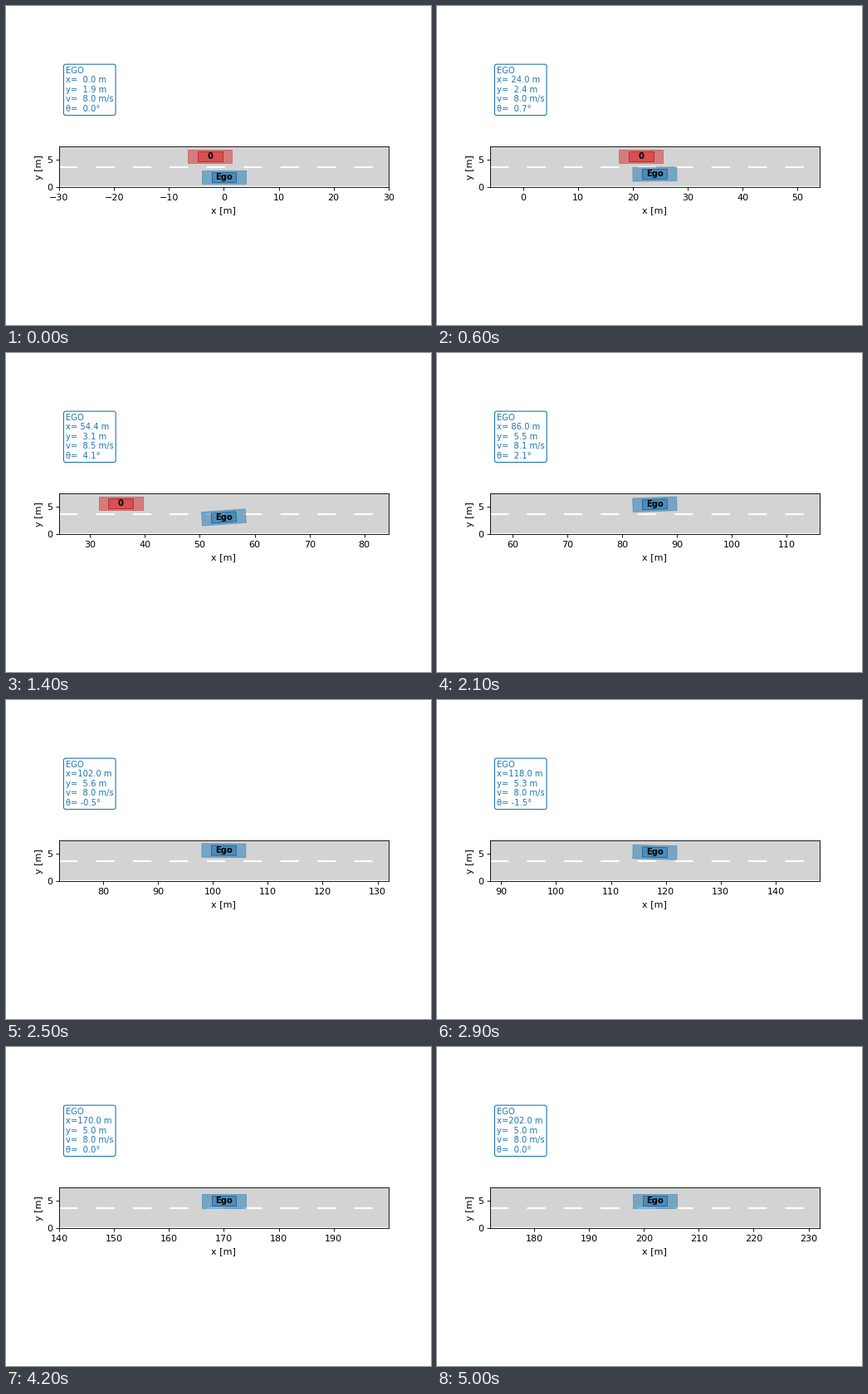
These frames come from a looping animation (512x384 px, 5.1 s). A matplotlib script:

```python
import matplotlib.pyplot as plt
import numpy as np
from matplotlib.animation import FuncAnimation
from matplotlib.colors import to_rgba
from matplotlib.patches import Rectangle

FRAMES, INTERVAL = 51, 100
DT = 0.5              # simulated seconds per frame
CRUISE = 8.0          # m/s
LANE = 3.7
VIEW = 30             # metres shown on each side of the ego car

plt.rcParams["font.family"] = "DejaVu Sans"


def bell(t, height, center, width):
    return height * np.exp(-((t - center) / width) ** 2 / 2)


def hump(t, height, start, length):
    """Smooth rise and fall that is zero outside its span."""
    phase = np.clip((t - start) / length, 0, 1)
    return height * np.sin(np.pi * phase) ** 2


def travel(start, rate):
    """Integrate a per-step rate with the trapezoid rule."""
    steps = (rate[1:] + rate[:-1]) / 2
    return start + np.concatenate([[0], np.cumsum(steps)])


# Ego: brakes behind the gap, speeds up to change lane, then settles.
n = np.arange(FRAMES)
speed = CRUISE - bell(n, 0.98, 10.4, 1.565) + bell(n, 1.735, 16.7, 1.8)
heading = (hump(n, 2.15, 0, 7.5) + hump(n, 5.1, 8.15, 16.5)
           - hump(n, 1.52, 22.6, 12.4))
ego_x = travel(0, speed * DT)
ego_y = travel(1.88, speed * DT * np.tan(np.radians(heading)))

# Other car: brakes to a halt, then creeps on; integrated on a fine grid.
SUB = 20
fine = np.arange((FRAMES - 1) * SUB + 1) / SUB
other_speed = np.interp(fine, [6, 13.05, 16.2, 19], [CRUISE, 0, 0, 3])
other_x = travel(-2.5, other_speed * DT / SUB)[::SUB]
other_y = 5.65


class Car:
    def __init__(self, ax, name, color, edge):
        self.boxes = [
            self.box(ax, 8.0, 2.5, color, to_rgba(color, 0.5), 3),
            self.box(ax, 4.5, 1.8, color, edge, 4),
        ]
        self.label = ax.text(0, 0, name, ha="center", va="center",
                             fontsize=9, fontweight="bold", zorder=5)

    @staticmethod
    def box(ax, length, width, color, edge, zorder):
        return ax.add_patch(Rectangle(
            (0, 0), length, width, rotation_point="center",
            fc=to_rgba(color, 0.5), ec=edge, lw=0.8, zorder=zorder))

    def place(self, x, y, angle=0):
        for box in self.boxes:
            box.set_xy((x - box.get_width() / 2, y - box.get_height() / 2))
            box.angle = angle
        self.label.set_position((x, y))


fig, ax = plt.subplots(figsize=(6.4, 4.8), dpi=80)
ax.set_aspect("equal")
ax.set_ylim(0, 2 * LANE)
ax.set_facecolor("lightgrey")
ax.set_xlabel("x [m]")
ax.set_ylabel("y [m]")
ax.xaxis.set_major_locator(plt.MultipleLocator(10))
ax.yaxis.set_major_locator(plt.MultipleLocator(5))

for edge_y in (0, 2 * LANE):
    ax.axhline(edge_y, color="white", lw=2, zorder=1)
ax.axhline(LANE, color="white", lw=2, ls=(0, (10, 10)), zorder=1)

other = Car(ax, "0", "tab:red", "#b02a2c")
ego = Car(ax, "Ego", "tab:blue", "#22628f")
info = ax.text(0.02, 2.978, "", transform=ax.transAxes, va="top", fontsize=9,
               color="tab:blue", zorder=6,
               bbox=dict(boxstyle="round,pad=0.25", fc="white",
                         ec="tab:blue", lw=1))


def draw(i):
    x, y, angle = ego_x[i], ego_y[i], heading[i]
    ax.set_xlim(x - VIEW, x + VIEW)
    ego.place(x, y, angle)
    other.place(other_x[i], other_y)
    info.set_text(f"EGO\nx={x:5.1f} m\ny={y:5.1f} m\n"
                  f"v={speed[i]:5.1f} m/s\nθ={angle:5.1f}°")
    return []


anim = FuncAnimation(fig, draw, frames=FRAMES, interval=INTERVAL,
                     init_func=lambda: draw(0), repeat=True)
plt.show()
```
